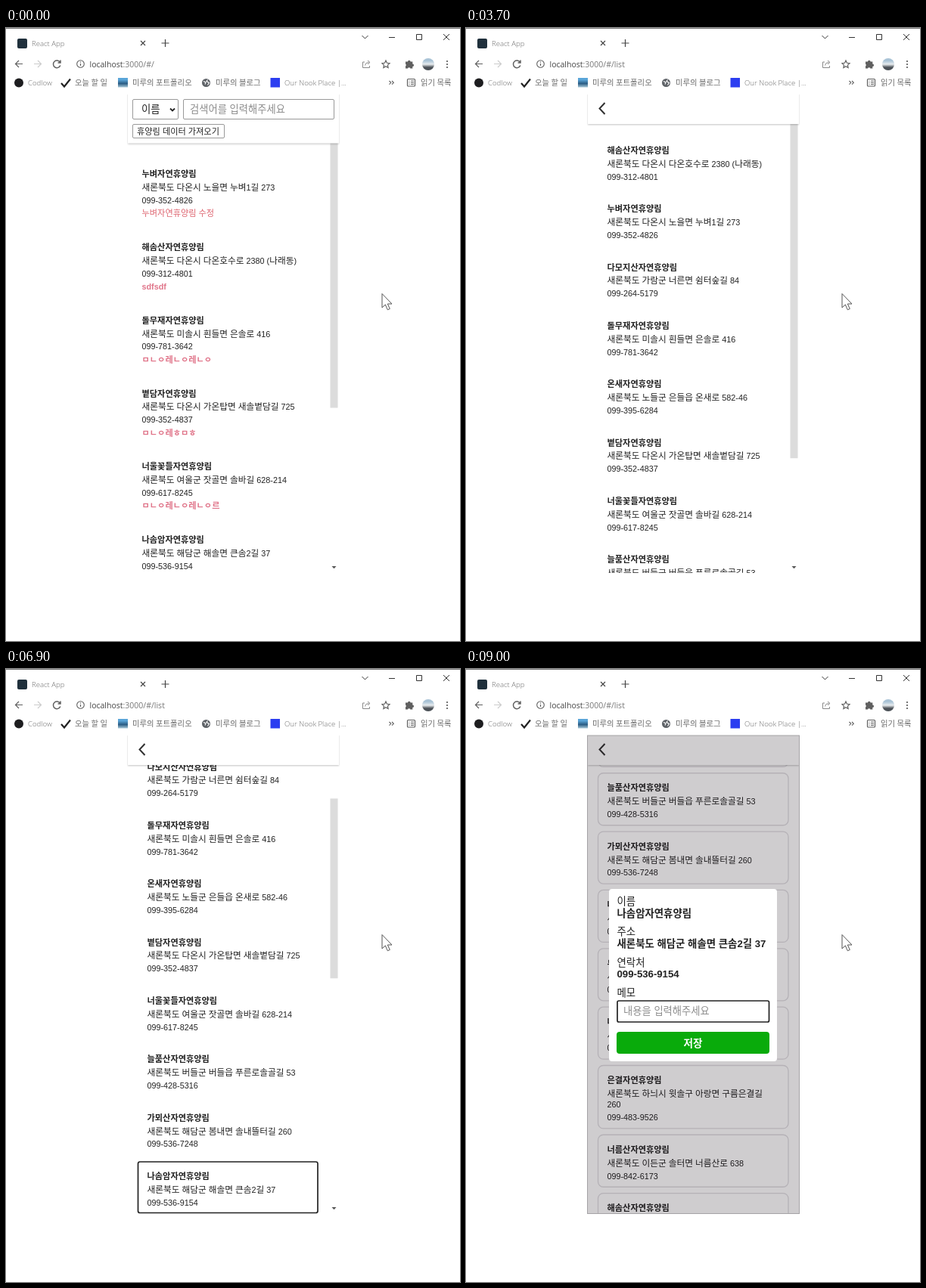
An HTML page that plays this animation: 600 by 811 pixels, repeating every 9.1 s.

```html
<!DOCTYPE html>
<html lang="ko">
<head>
<meta charset="utf-8">
<title>React App</title>
<style>
html, body { margin: 0; width: 100%; height: 100%; overflow: hidden; background: #fff; }
svg { display: block; }
text { white-space: pre; font-family: "Liberation Sans", Arial, sans-serif; }
.k { font-family: "Noto Sans CJK KR", "Noto Sans CJK", sans-serif; }
.ui text { font-family: "Open Sans", "Noto Sans", sans-serif; }
.line { fill: none; stroke: #606060; stroke-width: 1.2; }
.box { fill: #fff; stroke: #999; }
.ring { fill: none; stroke: #222; stroke-width: 1.7; }
.card { fill: none; stroke: none; }
.dim .card { stroke: #dedce0; stroke-width: 1.3; }
.head { fill: #fff; filter: drop-shadow(0 1px 1px rgba(0, 0, 0, .24)); }
.bar { fill: #dcdcdc; }
</style>
</head>
<body>
<svg width="600" height="811" viewBox="0 0 600 811">
  <defs>
    <clipPath id="view"><rect x="160" y="88" width="281" height="633"/></clipPath>
    <linearGradient id="photo" x2="0" y2="1">
      <stop offset=".2" stop-color="#a9c3d6"/><stop offset=".5" stop-color="#e8ecef"/><stop offset=".75" stop-color="#4b5157"/>
    </linearGradient>
    <linearGradient id="thumb" x2="0" y2="1">
      <stop offset=".2" stop-color="#5aa5d8"/><stop offset=".6" stop-color="#2b5d85"/><stop offset="1" stop-color="#a8c8d8"/>
    </linearGradient>
  </defs>

  <g class="ui">
    <path d="M0 .5H600" stroke="#777"/>
    <rect x="15" y="14" width="13" height="13" rx="2" fill="#20303c"/>
    <g class="line">
      <path d="M178 17l6 6m0-6l-6 6M205.500 20h10m-5-5v10" stroke="#444"/>
      <path d="M470.500 10l4 4 4-4M506 12.500h8M542.500 8.500h7v7h-7zM578 8l8 8m0-8l-8 8" stroke="#333" stroke-width="1"/>
      <path d="M22 47.500H12.500m4.500-4.500L12.500 47.500l4.500 4.500"/>
      <path d="M37 47.500h9.500m-4.500-4.500l4.500 4.500-4.500 4.500" stroke="#ccc"/>
      <path d="M71.500 45.500a4.800 4.800 0 1 0 .3 4M72 42.500v3.500h-3.500" stroke-width="1.500"/>
      <circle cx="98.500" cy="47.500" r="4.800" stroke-width="1.100"/>
      <path d="M98.500 47v3M98.500 44.500v1.200"/>
      <path d="M474 45h-2.500v7.500h9V50M474.500 49.500q.5-4 5-4M478 43l3 2.500-3 2.500" stroke="#888" stroke-width="1"/>
      <path d="M502 43l1.500 3.300 3.500.4-2.600 2.400.7 3.500-3.100-1.800-3.100 1.800.7-3.500-2.600-2.400 3.500-.4z"/>
      <rect x="530.500" y="67.500" width="10" height="9.500" rx="1"/>
      <path d="M532.500 70h1m1.500 0h4M532.500 72.300h1m1.500 0h4M532.500 74.600h1m1.500 0h4" stroke-width="1"/>
      <path d="M506.500 70l2.300 2.300-2.300 2.300m3.500-4.600l2.300 2.300-2.300 2.300" stroke-width="1.100"/>
      <path d="M73 73l4 4.500 8-10" stroke="#222" stroke-width="2.200"/>
    </g>
    <path d="M528 44.500h3a1.800 1.800 0 0 1 3.600 0h2.700v3a1.800 1.800 0 0 1 0 3.600v2.400h-3a1.700 1.700 0 0 0-3.300 0h-3v-3a1.800 1.800 0 0 0 0-3z" fill="#606060"/>
    <circle cx="558" cy="48" r="8" fill="url(#photo)"/>
    <g fill="#555"><circle cx="583" cy="44" r="1.100"/><circle cx="583" cy="48" r="1.100"/><circle cx="583" cy="52" r="1.100"/></g>
    <circle cx="17" cy="72.500" r="6" fill="#1d1d1f"/>
    <rect x="148" y="66" width="13" height="12.500" fill="url(#thumb)"/>
    <circle cx="264.500" cy="72.500" r="5.500" fill="#5f6368"/>
    <path d="M261 70.500l3 1.500-1 2.500m3.500-6l-1.500 2 3.500 2-2 3" fill="none" stroke="#fff" stroke-width="1.200"/>
    <rect x="349.500" y="66" width="12.500" height="12.500" fill="#2b3df0"/>
    <g id="labels"></g>
  </g>

  <g id="home" clip-path="url(#view)">
    <g id="homeList"></g>
    <rect class="bar" x="428.500" y="101" width="10" height="401.500"/>
    <rect class="head" x="161" y="84" width="279" height="68.500"/>
    <rect class="box" x="167.500" y="94.500" width="60" height="26" rx="1.500"/>
    <path d="M217 106.500l3 3 3-3" fill="none" stroke="#222" stroke-width="1.800"/>
    <rect class="box" x="234.500" y="94.500" width="199" height="26" rx="1.500"/>
    <rect class="box" x="167.500" y="127.500" width="121" height="18" rx="1.500"/>
    <g id="form"></g>
    <path id="caret" d="M243.500 100v14" stroke="#222"/>
    <rect id="formRing" class="ring" rx="2"/>
  </g>

  <g id="list" clip-path="url(#view)">
    <g id="scroll">
      <g id="items"></g>
      <rect id="itemRing" class="ring" x="174.500" width="237.500" height="67.500" rx="2.500"/>
    </g>
    <rect id="bar" class="bar" x="428.500" width="10"/>
    <rect class="head" x="161" y="84" width="279" height="43"/>
    <path d="M183.500 99l-7 7.500 7 7.500" fill="none" stroke="#333" stroke-width="2"/>
  </g>
  <path id="arrow" d="M430.500 712h6l-3 3.200z" fill="#555"/>

  <g id="modal">
    <rect x="160.500" y="88" width="280" height="632.500" fill="#0c000c" fill-opacity=".195" stroke="#a5a3a6"/>
    <rect x="189" y="291" width="222" height="228" rx="4" fill="#fff"/>
    <rect class="ring" x="200" y="439" width="200.500" height="28" rx="2"/>
    <rect x="199" y="480" width="202" height="29" rx="4" fill="#09ab0b"/>
    <g id="fields"></g>
  </g>

  <path d="M497 351.500v18.500l4.300-4 3 6.800 3-1.300-3-6.500h5.700z" fill="#fff" stroke="#555"/>
</svg>
<script>
const $ = id => document.getElementById(id);

// Latin size, Hangul size, Hangul weight and colour of each text style
const styles = {
  title: [10.8, 11.2, 700, '#222'],
  body: [10.8, 11.7, 300, '#222'],
  memo: [10.8, 11.2, 700, '#e0758a'],
  note: [10.8, 11.2, 400, '#de6570'],
  mark: [9.6, 10.35, 300, '#6a6a6a'],
  url: [10.5, 10.5, 400, '#777'],
  hint: [13.2, 13.3, 300, '#8c8c8c'],
  label: [13.2, 13.4, 300, '#222'],
  strong: [13.2, 13.4, 700, '#222'],
  button: [10.8, 11.2, 300, '#222'],
  save: [13.2, 13.6, 700, '#fff']
};

function text(x, y, str, style) {
  const [size, hangul, weight, color] = styles[style];
  const runs = str.replace(/[ㄱ-ㆎ가-힣]+/g, `<tspan class="k" font-size="${hangul}">$&</tspan>`);
  return `<text x="${x}" y="${y}" font-size="${size}" font-weight="${weight}" fill="${color}">${runs}</text>`;
}

const forests = [
  ['해솜산자연휴양림', '새론북도 다온시 다온호수로 2380 (나래동)', '099-312-4801'],
  ['누벼자연휴양림', '새론북도 다온시 노을면 누벼1길 273', '099-352-4826'],
  ['다모지산자연휴양림', '새론북도 가람군 너른면 쉼터숲길 84', '099-264-5179'],
  ['돌무재자연휴양림', '새론북도 미솔시 흰들면 은솔로 416', '099-781-3642'],
  ['온새자연휴양림', '새론북도 노들군 은들읍 온새로 582-46', '099-395-6284'],
  ['볕담자연휴양림', '새론북도 다온시 가온탑면 새솔볕담길 725', '099-352-4837'],
  ['너울꽃들자연휴양림', '새론북도 여울군 잣골면 솔바길 628-214', '099-617-8245'],
  ['늘품산자연휴양림', '새론북도 버들군 버들읍 푸른로솔골길 53', '099-428-5316'],
  ['가뫼산자연휴양림', '새론북도 해담군 봄내면 솔내뜰터길 260', '099-536-7248'],
  ['나솜암자연휴양림', '새론북도 해담군 해솔면 큰솜2길 37', '099-536-9154'],
  ['두솜산숲체험휴양마을', '새론북도 나린군 두솜산면 두솜산로 748', '099-671-5382'],
  ['나루의산자연휴양림', '새론북도 노들군 샘골면 차솔로 524-306', '099-395-6147'],
  ['은결자연휴양림', '새론북도 하늬시 윗솔구 아랑면 구름은결길|260', '099-483-9526'],
  ['너름산자연휴양림', '새론북도 이든군 솔터면 너름산로 638', '099-842-6173']
];

// Title baseline at y; returns the extra height of wrapped lines
function entry(x, y, [name, address, phone]) {
  const lines = address.split('|');
  const extra = (lines.length - 1) * 14.4;
  const svg = text(x, y, name, 'title') +
    lines.map((s, i) => text(x, y + 17.7 + i * 14.4, s, 'body')).join('') +
    text(x, y + 34.6 + extra, phone, 'body');
  return { svg, extra };
}

$('homeList').innerHTML = [
  [1, '누벼자연휴양림 수정', 'note'], [0, 'sdfsdf'], [3, 'ㅁㄴㅇ레ㄴㅇ레ㄴㅇ'],
  [5, 'ㅁㄴㅇ레ㅎㅁㅎ'], [6, 'ㅁㄴㅇ레ㄴㅇ레ㄴㅇ르'], [9, '']
].map(([n, memo, style = 'memo'], i) => {
  const y = 197.2 + i * 96.8;
  return entry(179.5, y, forests[n]).svg + text(179.5, y + 52, memo, style);
}).join('');

const tops = [];
let y = 166, rows = '';
for (const f of [...forests, forests[0]]) {
  const { svg, extra } = entry(186.5, y, f);
  tops.push(Math.round(y - 22.7));
  rows += `<rect class="card" x="174.500" y="${y - 23.7}" width="251.500" height="${69 + extra}" rx="7"/>` + svg;
  y += 77.35 + extra;
}
$('items').innerHTML = rows;

$('form').innerHTML = text(179, 112.3, '이름', 'label') +
  text(243, 112, '검색어를 입력해주세요', 'hint') +
  text(173, 141, '휴양림 데이터 가져오기', 'button');

const chosen = forests[9];
$('fields').innerHTML = [['이름', chosen[0]], ['주소', chosen[1]], ['연락처', chosen[2]]]
  .map(([k, v], i) => text(199.5, 312 + i * 40.3, k, 'label') + text(199.5, 327.5 + i * 40.3, v, 'strong'))
  .join('') + text(199.5, 433, '메모', 'label') +
  text(208, 457, '내용을 입력해주세요', 'hint') + text(287.5, 500, '저장', 'save');

$('labels').innerHTML = [
  [34, 23.5, 'React App'], [29, 76, 'Codlow'], [91, 76, '오늘 할 일'], [167, 76, '미루의 포트폴리오'],
  [277, 76, '미루의 블로그'], [368, 76, 'Our Nook Place |...'], [548, 76, '읽기 목록']
].map(([x, y, s]) => text(x, y, s, 'mark')).join('') +
  text(110.5, 51.5, '<tspan fill="#444">localhost</tspan>:3000/#/<tspan id="route">list</tspan>', 'url');

const controls = {
  select: [167, 94, 61, 27],
  input: [234.5, 94, 199, 27],
  button: [166, 126.5, 123.5, 20]
};

// Each step changes part of the state at its time in ms
const steps = [
  [0, { page: 'home', focus: '', caret: false, item: -1, scroll: 0, height: 818, modal: false }],
  [600, { focus: 'select' }],
  [1300, { focus: 'input', caret: true }],
  [1700, { caret: false }],
  [2200, { caret: true }],
  [2400, { focus: 'button', caret: false }],
  [3200, { page: 'list' }],
  [4100, { item: 0 }],
  [4600, { item: 1 }],
  [5100, { item: 2 }],
  [5400, { item: 3 }],
  [5600, { item: 4 }],
  [5900, { item: 5 }],
  [6100, { item: 6 }],
  [6400, { item: 7, scroll: 32 }],
  [6600, { item: 8, scroll: 187 }],
  [6800, { item: 9, height: 1610 }],
  [7200, { item: 10, scroll: 546 }],
  [8100, { item: 9 }],
  [8700, { modal: true }]
];

const set = (el, attrs) => { for (const k in attrs) el.setAttribute(k, attrs[k]); };
const show = (id, on) => { $(id).style.display = on ? '' : 'none'; };

function render(s) {
  const list = s.page === 'list';
  show('home', !list);
  show('list', list);
  show('route', list);
  show('caret', s.caret);
  show('formRing', s.focus);
  if (s.focus) {
    const [x, y, width, height] = controls[s.focus];
    set($('formRing'), { x, y, width, height });
  }
  show('itemRing', s.item >= 0 && !s.modal);
  if (s.item >= 0) set($('itemRing'), { y: tops[s.item] });
  set($('scroll'), { transform: `translate(0 ${-s.scroll})` });
  // The thumb runs behind the header on a 606px track
  const ratio = 606 / s.height;
  set($('bar'), { y: 101 + s.scroll * ratio, height: 632 * ratio });
  show('bar', !s.modal);
  show('arrow', !s.modal);
  show('modal', s.modal);
  $('list').classList.toggle('dim', s.modal);
}

let last = 0;
function tick() {
  const t = performance.now() % 9100;
  const past = steps.filter(([at]) => at <= t);
  if (past.length !== last) {
    last = past.length;
    render(Object.assign({}, ...past.map(p => p[1])));
  }
  requestAnimationFrame(tick);
}
tick();
</script>
</body>
</html>
```
